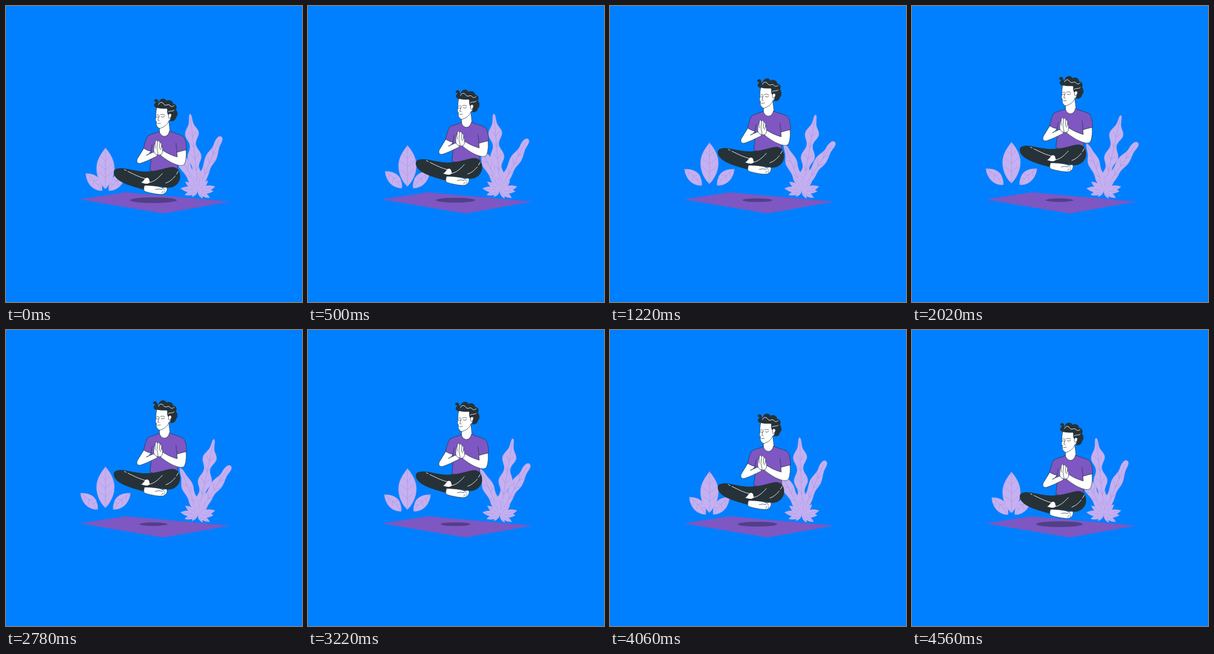
An HTML page for the animation above (4700 ms loop, 500 by 500 pixels).

```html
<!DOCTYPE html>
<html lang="en">
<head>
<meta charset="utf-8">
<title>Floating meditation</title>
<style>
  html, body { margin: 0; width: 100%; height: 100%; overflow: hidden; background: #0080ff; }
  svg { display: block; width: 100%; height: 100%; }
  .plant path { fill: #c5b0f1; stroke: #bda6ec; stroke-width: .6; }
  .plant .vein { fill: none; stroke: #a08ad9; stroke-width: .5; }
  .skin { fill: #fff; stroke: #263238; stroke-width: .7; }
  .shirt { fill: #7e57c2; stroke: #263238; stroke-width: .7; }
  .dark { fill: #263238; }
  .line { fill: none; stroke: #263238; stroke-width: .7; }
  .light { fill: none; stroke: #fff; stroke-width: .9; }
  path { stroke-linecap: round; stroke-linejoin: round; }
</style>
</head>
<body>
<svg viewBox="0 0 500 500">
  <defs>
    <g id="side" class="plant">
      <path d="M135 283C146 283 156 287 160 296C162 302 163 308 162 312C152 312 143 306 139 298C136 292 135 288 135 283Z"/>
      <path class="vein" d="M135 283Q151 294 162 312M142 288L141 296M148 294L147 303M149 295L156 294M155 302L160 300"/>
    </g>
  </defs>

  <path d="M124.500 326.700L202 314.800L378.500 330.600L266 350.400Z" fill="#7e57c2"/>
  <ellipse id="shadow" cx="249" cy="328" fill="#513f87"/>

  <g id="sideLeft"><use href="#side"/></g>
  <g transform="matrix(-1 0 0 1 336 0)"><g id="sideRight"><use href="#side"/></g></g>
  <g id="middle" class="plant">
    <path d="M168 240C176 249 183 261 183 274C183 289 175 302 168 309C160 302 153 289 153 274C153 260 161 249 168 240Z"/>
    <path class="vein" d="M168 240V309M168 262L161 255M168 262L175 255M168 276L156 266M168 276L180 266M168 290L157 281M168 290L179 281"/>
  </g>

  <g class="plant">
    <g id="back">
      <path d="M0 -83C4 -78 4 -73 5 -68C7 -60 10 -55 9 -46C7 -38 6 -34 8 -27C9 -18 5 -7 0 0C-6 -8 -9 -17 -7 -26C-6 -33 -9 -40 -10 -48C-10 -57 -5 -61 -4 -68C-3 -74 -3 -79 0 -83Z"/>
      <path class="vein" d="M0 -78V0M0 -50L-6 -56M0 -38L6 -46M0 -22L-5 -30"/>
    </g>
    <g id="tall">
      <path d="M0 -128C3 -128 2 -117 4 -111C6 -105 11 -102 11 -95C10 -88 4 -84 4 -76C4 -69 11 -64 11 -56C11 -49 5 -45 5 -38C5 -31 11 -27 10 -18C8 -9 3 -4 0 0C-5 -5 -10 -11 -10 -20C-10 -27 -6 -31 -6 -37C-6 -44 -12 -48 -12 -55C-12 -63 -6 -67 -6 -75C-6 -83 -12 -87 -12 -94C-12 -101 -6 -106 -4 -112C-2 -118 -3 -128 0 -128Z"/>
      <path class="vein" d="M0 -122V0M0 -90L-6 -98M0 -90L6 -98M0 -72L-4 -79M0 -72L4 -79M0 -52L-7 -60M0 -52L7 -60M0 -32L-4 -40M0 -32L5 -40M0 -14L-6 -22M0 -14L6 -22"/>
    </g>
    <g id="right">
      <path d="M0 -97C5 -98 6 -92 5 -84C4 -77 8 -69 8 -60C8 -51 4 -47 5 -38C7 -25 6 -9 0 0C-8 -8 -10 -19 -8 -30C-6 -39 -10 -47 -10 -56C-10 -65 -5 -71 -5 -79C-6 -87 -5 -96 0 -97Z"/>
      <path class="vein" d="M0 -90V0M0 -64L-5 -74M0 -64L5 -72M0 -48L-7 -57M0 -48L6 -56M0 -29L-5 -38M0 -29L5 -37"/>
    </g>
    <g id="crown" transform="translate(324 312)"></g>
  </g>

  <g id="man">
    <path class="skin" d="M260 200L259 213C262 224 273 224 277 211L275 194Z"/>
    <path class="shirt" d="M259 212C254 215 244 216 239 220C236 226 234 233 232.500 240C236 243 240 245 245 245L246 252L243 277C255 284 278 284 290 277L289 247L305 243C305 232 303 224 299 220C292 216 282 215 276 211C274 223 262 223 259 212Z"/>
    <path class="line" d="M245 245L247 234M289 247L287 232"/>
    <path class="dark" d="M182 281C182 274 192 273 203 275C220 278 232 281 243 279C262 278 270 272 282 272C292 273 295 282 294 291C292 301 283 308 272 307C262 304 245 304 236 303L232 310C214 305 192 299 185 289C183 286 182 284 182 281Z"/>
    <path class="light" d="M200 276.500L203 278M206 279.500C216 284 226 290 238 292M264 283C257 291 250 297 242 298M291 279L288 284M286 287C281 293 276 297 270 299"/>
    <path fill="#fff" d="M228 298C233 297 233 291 238 290C242 290 242 294 243 298C239 302 233 300 228 298Z"/>
    <path class="skin" d="M234 303C245 303 257 304 264 307L271 306C274 310 271 316 265 318C258 319 243 316 234 313C232 310 233 306 234 303Z"/>
    <path class="line" d="M252 310Q258 308 264 310M264 307L268 311M263 316L265 313M267 315L268 313"/>
    <path class="skin" d="M233 240.500C237 243 241 245 245 245C242 249 240 252 237 252L251 246L256 253C246 258 234 264 226 266C221 266 220 262 222 258Z"/>
    <path class="skin" d="M289 247L304 243C305 253 304 262 301 268C298 270 294 270 288 268C276 264 266 256 261 252L265 244C272 249 282 253 289 255Z"/>
    <path class="skin" d="M250 247C249 240 250 234 252 231C252 227 255 225 256 229C258 226 260 229 260 231C262 229 263 233 263 237C265 241 265 247 263 250C260 253 253 252 250 247Z"/>
    <path class="line" d="M256 229L255 240L257 251M260 231L259 241M263 236L261 243M252 231L252 240"/>

    <path class="skin" d="M255 171C253 178 253 184 253.500 188C252 192 252 193 254 195L254 201C256 205 259 208 262 206C268 204 273 200 275 194L281 188L276 174Z"/>
    <path class="line" d="M255 187.500Q257 189 258 187.500M262 187Q265 189 268 186.500M255 184L258 184M261 183.500Q265 182 268 184M259 185L256.500 193L259 194M256 198.500L261 198"/>
    <path class="dark" d="M255 172C251 168 254 163 258 163C259 156 268 154 271 160C276 157 283 161 282 165C287 165 290 171 287 175C291 179 290 187 287 188C287 193 281 196 277 194C279 190 277 188 274 184C271 180 273 177 272 173C266 174 259 173 255 172Z"/>
    <path class="skin" d="M275 189C273 185 275 181 278 182C281 183 279 189 276 190Z"/>
    <path class="light" d="M257 168C259 161 264 162 266 165C270 171 273 164 277 168C279 171 282 170 284 168M274 179C277 176 280 179 284 176"/>
    <path class="dark" id="curl" d="M259 172C250 173 248 167 252 164C254 162 253 161 250.500 161.500C249 156.500 257 155.500 257 161C258 165 255 167 260 167Z"/>
  </g>
</svg>
<script>
const LOOP = 4700, HALF = 2280;
const el = id => document.getElementById(id);
const transform = (id, value) => el(id).setAttribute('transform', value);

const blades = [[-29, -4], [-22, 7], [-21, -15], [-11, -24], [4, -26], [17, -17],
                [29, -7], [26, 1], [20, 12], [8, 13], [-10, 10]];
el('crown').innerHTML = blades.map(([x, y]) => {
  const bend = side => `${x / 2 - y * .32 * side} ${y / 2 + x * .32 * side}`;
  return `<path d="M0 0Q${bend(1)} ${x} ${y}Q${bend(-1)} 0 0Z"/><path class="vein" d="M${x * .3} ${y * .3}L${x * .8} ${y * .8}"/>`;
}).join('');

// cubic-bezier(x1, 0, x2, 1)
function ease(u, [x1, x2]) {
  let low = 0, high = 1, s;
  for (let i = 0; i < 24; i++) {
    s = (low + high) / 2;
    const x = 3 * s * (1 - s) ** 2 * x1 + 3 * s * s * (1 - s) * x2 + s ** 3;
    if (x < u) low = s; else high = s;
  }
  return s * s * (3 - 2 * s);
}

const swing = (t, rise, fall) =>
  t < HALF ? ease(t / HALF, rise) : 1 - ease((t - HALF) / HALF, fall);

function draw(now) {
  const t = Math.min(now % LOOP, HALF * 2);
  const lift = swing(t, [.333, 0], [1, .667]);
  const leaf = swing(t, [.3, 0], [.45, .42]);
  const sway = swing(t, [.63, 0], [.68, .71]);

  transform('man', `translate(0 ${-38.3 * lift})`);
  transform('curl', `rotate(${-9 * lift} 257 172)`);
  el('shadow').setAttribute('rx', 39.5 - 16 * lift);
  el('shadow').setAttribute('ry', 4.8 - 1.9 * lift);

  const side = `translate(${-8 * leaf} ${-10 * leaf}) rotate(${-4 * leaf} 162 312)`;
  transform('sideLeft', side);
  transform('sideRight', side);
  transform('middle', `translate(0 ${-9.8 * leaf})`);

  const lean = (id, angle) => transform(id, `translate(325 310) rotate(${angle})`);
  lean('tall', -6.3 + 18.9 * sway);
  lean('right', 22.6 + 12.1 * leaf);
  lean('back', -29 + 8 * leaf);
  requestAnimationFrame(draw);
}
draw(performance.now());
</script>
</body>
</html>
```
